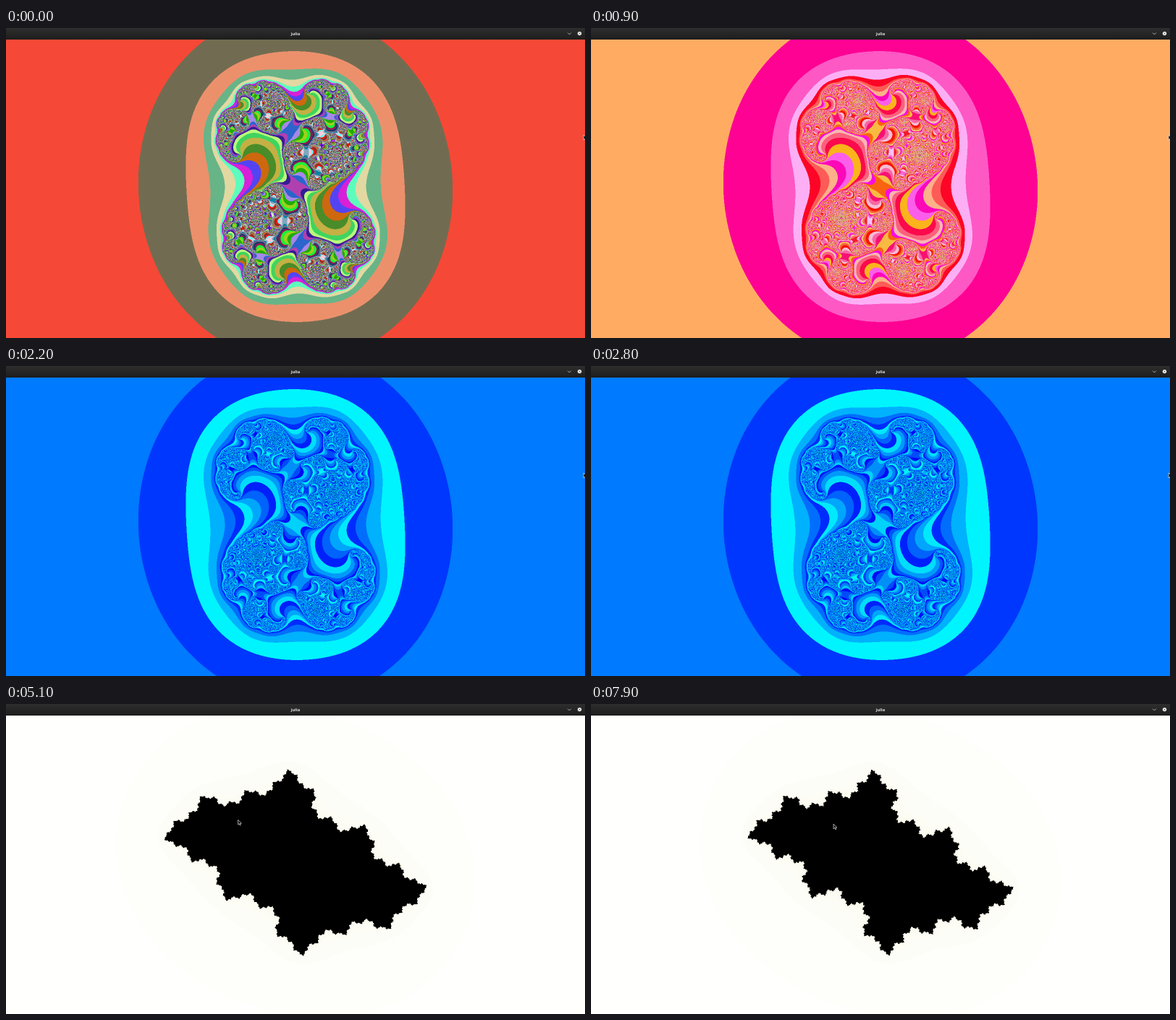
Recreate the animation shown at these times as an HTML page with a canvas. Size 800 by 429 pixels, loop 8 s.

```html
<!DOCTYPE html>
<html lang="en">
<head>
<meta charset="utf-8">
<title>julia</title>
<style>
  html, body { margin: 0; width: 100%; height: 100%; overflow: hidden; background: #000; }
  canvas, svg { position: absolute; left: 0; top: 0; width: 800px; height: 429px; }
  canvas { top: 15px; height: 414px; }
  text { font: bold 5.8px "Noto Sans", "Open Sans", sans-serif; fill: #e4e4e4; text-anchor: middle; }
</style>
</head>
<body>
<canvas id="view" width="800" height="414"></canvas>
<svg viewBox="0 0 800 429">
  <defs>
    <linearGradient id="bar" x2="0" y2="1">
      <stop stop-color="#2e2e2e"/><stop offset="1" stop-color="#1d1d1d"/>
    </linearGradient>
  </defs>
  <rect width="800" height="16" fill="url(#bar)"/>
  <text x="400" y="9.8">julia</text>
  <path d="M776 6.6l2.4 2.4 2.4-2.4" fill="none" stroke="#d0d0d0" stroke-width=".8"/>
  <circle cx="792.5" cy="7.6" r="2.7" fill="#f2f2f2"/>
  <path d="M791.6 6.7l1.8 1.8m0-1.8l-1.8 1.8" stroke="#222" stroke-width=".7"/>
  <path id="cursor" d="M0 0V6.8L1.6 5.4 2.7 7.8 3.7 7.3 2.7 5H4.8Z" fill="#111" stroke="#fff" stroke-width=".6"/>
</svg>
<script>
const LOOP = 8000, STEP = 100;
const W = 1600, H = 828;          // two samples per screen pixel
const MID_Y = 409, UNIT = W / 6;  // the real axis spans -3..3
const MAX = 200, ESCAPE = 9;

const view = document.getElementById('view').getContext('2d');
const cursor = document.getElementById('cursor');
const big = document.createElement('canvas');
big.width = W;
big.height = H;
const bigCtx = big.getContext('2d');
const image = bigCtx.createImageData(W, H);
const pixels = new Uint32Array(image.data.buffer);
const counts = new Uint8Array(W * H);
const palette = new Uint32Array(MAX + 1);

// 0 before a, 1 after b, linear between
const ramp = (t, a, b) => Math.min(1, Math.max(0, (t - a) / (b - a)));

function hsv(h, s, v) {
  return [5, 3, 1].map(k => {
    const m = (k + h / 60) % 6;
    return v * (1 - s * Math.max(0, Math.min(m, 4 - m, 1)));
  });
}

// Brighten, turn to blue, then fade to white
function tintAt(t) {
  const glow = ramp(t, 0, 900), turn = ramp(t, 900, 1600), fade = ramp(t, 2800, 3300);
  return hsv(
    5.6 + 5.2 * glow + 184.8 * turn - 135.6 * fade,
    .78 + .028 * glow + .192 * turn - .996 * fade,
    .4805 + .5179 * glow);
}

// One fixed seed, then a click and a drag along a straight line
function seedAt(t) {
  if (t < 4500) return [.3463, -.0589];
  const f = .6 * ramp(t, 4500, 5300) - .6 + ramp(t, 5500, 6100) - .7 * ramp(t, 6500, 7900);
  return [-.44 - .05 * f, -.41 - .084 * f];
}

function mouseAt(t) {
  const back = ramp(t, 6500, 7900);
  return [
    798 - 448 * ramp(t, 3500, 4350) ** 2 - 42 * ramp(t, 4400, 5400) + 27 * back,
    148 - 4 * ramp(t, 3500, 4000) + 24 * ramp(t, 4000, 4400)
      - 10 * ramp(t, 4400, 5300) + 16 * ramp(t, 5300, 6100) - 8 * back];
}

// Number of steps until z leaves the disc; 0 if it stays
function escapeCount(x, y, cx, cy) {
  for (let n = 2; n <= MAX; n++) {
    const nx = x * x - y * y + cx;
    y = 2 * x * y + cy;
    x = nx;
    if (x * x + y * y > ESCAPE) return n;
  }
  return 0;
}

// The set is symmetric about its centre, so the lower half is copied
function iterate([cx, cy]) {
  const mirrorEnd = W * MID_Y * 2;
  for (let j = 0, k = 0; j < H; j++) {
    const mirrored = j >= MID_Y && j < MID_Y * 2;
    const y = (j + .5 - MID_Y) / UNIT;
    for (let i = 0; i < W; i++, k++) {
      counts[k] = mirrored ? counts[mirrorEnd - 1 - k]
        : escapeCount((i + .5 - W / 2) / UNIT, y, cx, cy);
    }
  }
}

function paint(tint) {
  for (let n = 0; n <= MAX; n++) {
    const [r, g, b] = tint.map(v => Math.floor(n * v % 1 * 256));
    palette[n] = (255 << 24 | b << 16 | g << 8 | r) >>> 0;
  }
  for (let k = 0; k < pixels.length; k++) pixels[k] = palette[counts[k]];
  bigCtx.putImageData(image, 0, 0);
  view.drawImage(big, 0, 0, 800, 414);
}

let lastSeed = '', lastTint = '';
function draw(now) {
  const t = Math.floor(now % LOOP / STEP) * STEP;
  const seed = seedAt(t), tint = tintAt(t);
  const newSeed = lastSeed !== String(seed);
  if (newSeed) iterate(seed);
  if (newSeed || lastTint !== String(tint)) paint(tint);
  lastSeed = String(seed);
  lastTint = String(tint);
  cursor.setAttribute('transform', `translate(${mouseAt(t)})`);
}

const start = performance.now();
function tick() {
  draw(performance.now() - start);
  requestAnimationFrame(tick);
}
tick();
</script>
</body>
</html>
```
